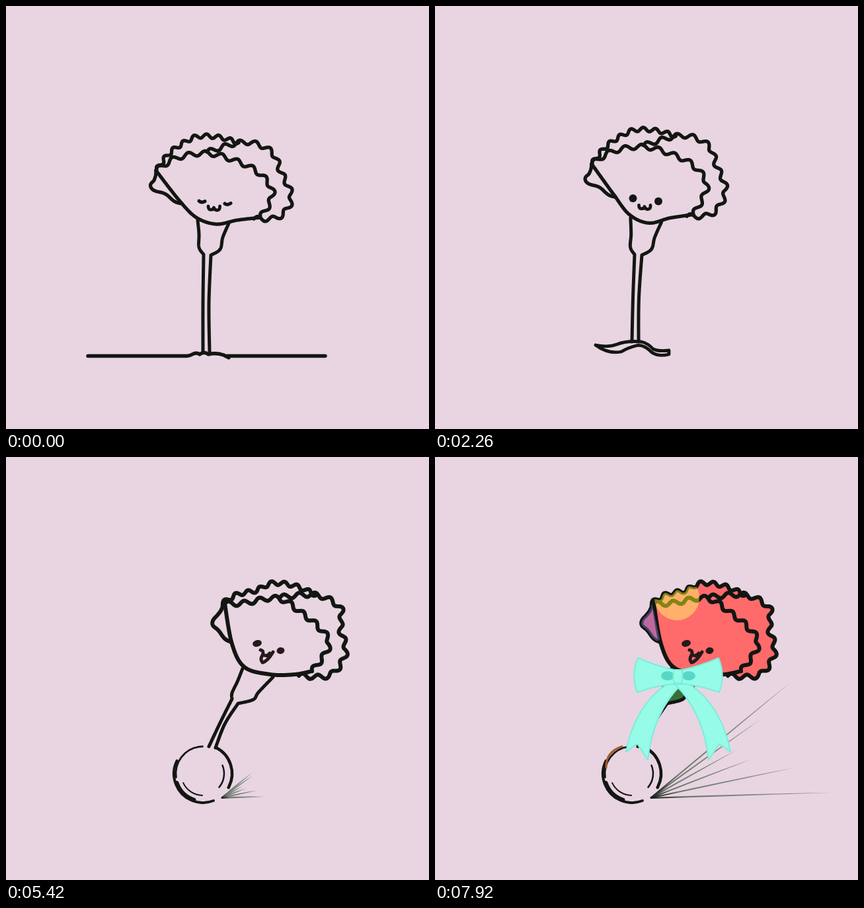
Animation of 640x640 px, one loop 8000 ms. Source, as an HTML page with a canvas:

```html
<!DOCTYPE html>
<html>
<head>
<meta charset="utf-8">
<style>
html, body { margin: 0; height: 100%; overflow: hidden; background: #e8d5e1; }
canvas { display: block; width: 100vw; height: 100vh; }
</style>
</head>
<body>
<canvas id="stage" width="640" height="640"></canvas>
<script>
const c = document.getElementById('stage').getContext('2d');
const INK = '#131612', BG = '#e8d5e1', RED = '#ff6a6b', GREEN = '#386e37';
const clamp = (v) => Math.max(0, Math.min(1, v));
const mix = (a, b, k) => a + (b - a) * k;
const ease = (v) => v * v * (3 - 2 * v);
const step = (t, start, size = 100) => Math.floor((t - start) / size);
const noise = (i) => { const v = Math.sin(i * 12.9898) * 43758.5453; return v - Math.floor(v); };
const points = (s) => s.split(' ').map(p => p.split(',').map(Number));

// Key points of an edge, upright and running, with the number of frills on it
const edge = (up, run, frills = 0, depth = 3.6) => ({ up: points(up), run: points(run), frills, depth });
const back = edge('228,248 247,223 272,205 293,197 325,199 352,207',
  '328,221 350,208 378,202 403,191 437,195 470,209', 8, 3);
const side = edge('304,221 361,206 401,220 416,251 432,290 413,319 375,322',
  '415,212 470,209 506,229 506,260 514,296 490,330 443,331', 11);
const front = edge('227,249 258,230 305,223 352,236 382,252 402,276 400,296 385,320',
  '331,222 360,221 412,214 450,238 474,258 489,279 482,299 463,324', 10);
const chin = edge('385,320 350,324 318,330 288,320 262,294 227,249',
  '463,324 437,329 400,329 361,318 342,283 331,222');
const fold = edge('227,249 223,262 223,276 266,299', '328,221 320,240 314,257 341,280', 2, 2);
const cupL = edge('290,324 292,345 292,365 299,376', '358,320 350,340 342,357 342,366');
const cupR = edge('337,329 328,350 324,368 310,377', '404,333 382,356 374,367 351,373');
const stemL = edge('299,376 298,450 298,524', '342,366 325,400 307,438');
const stemR = edge('310,377 307,450 308,524', '351,373 331,404 317,440');

function stroke(path, width, color = INK) {
  c.lineWidth = width;
  c.strokeStyle = color;
  c.stroke(typeof path == 'string' ? new Path2D(path) : path);
}
function fill(path, color) {
  c.fillStyle = color;
  c.fill(typeof path == 'string' ? new Path2D(path) : path);
}
function dot(x, y, rx, ry = rx, color = INK, turn = 0) {
  c.fillStyle = color;
  c.beginPath();
  c.ellipse(x, y, rx, ry, turn, 0, 7);
  c.fill();
}

// Upright key points bent by the pose, then blended into the running ones
function place(e, s) {
  return e.up.map(([x, y], i) => {
    const high = clamp((524 - y) / 148), tip = clamp((336 - y) / 36);
    const px = x + high * (s.dx + 3 * s.bend) + s.bend * 0.055 * Math.max(0, 376 - y);
    const py = y + high * s.dy - 10 * s.bend * tip + (s.foot - 524) * (1 - high);
    return [mix(px, e.run[i][0], s.run), mix(py, e.run[i][1], s.run)];
  });
}

// Smooth curve through the key points, with frills across it
function curve(e, s) {
  const keys = place(e, s), last = keys.length - 1, at = (i) => keys[Math.max(0, Math.min(last, i))];
  const line = [], far = [0], N = 24;
  for (let i = 0; i <= last * N; i++) {
    const k = Math.min(last - 1, Math.floor(i / N)), u = i / N - k;
    line.push([0, 1].map(d => {
      const [a, b, e, f] = [-1, 0, 1, 2].map(o => at(k + o)[d]);
      return b + u * (e - a + u * (2 * a - 5 * b + 4 * e - f + u * (3 * (b - e) + f - a))) / 2;
    }));
    if (i) far.push(far[i - 1] + Math.hypot(line[i][0] - line[i - 1][0], line[i][1] - line[i - 1][1]));
  }
  if (!e.frills) return line;
  return line.map(([x, y], i) => {
    const p = line[Math.max(0, i - 1)], q = line[Math.min(line.length - 1, i + 1)];
    const dx = q[0] - p[0], dy = q[1] - p[1], len = Math.hypot(dx, dy) || 1;
    const w = e.depth * Math.sin(2 * Math.PI * e.frills * far[i] / far[far.length - 1]);
    return [x + dy / len * w, y - dx / len * w];
  });
}
function trace(line) {
  const path = new Path2D();
  line.forEach(p => path.lineTo(...p));
  return path;
}

function pose(t) {
  const s = { run: 0, bend: 0, dx: 0, dy: 0, foot: 524, eyes: 'shut', fx: 0, fy: 0, my: 0, ground: 0, feet: false, tilt: 0 };
  if (t >= 500) s.eyes = 'open';
  if (t >= 700) s.dx = 1;
  if (t >= 1200) Object.assign(s, { eyes: 'strain', dx: -4, dy: 8, fx: -4, fy: 8 });
  if (t >= 1500) {
    const u = clamp(step(t, 1500, 58.4) / 13);
    const leap = -30 * Math.sin(Math.PI * clamp((u - 0.3) / 0.7));
    const off = 1 - ease(clamp((u - 0.2) / 0.4));
    s.bend = ease(clamp((u - 0.35) / 0.5));
    s.dx = -4 * off + (u < 0.45 ? 4 * Math.sin(u * 40) : 0);
    s.dy = 8 * off + leap;
    s.feet = u > 0.38;
    s.foot = s.feet ? 508 + leap : 524;
    s.fx = s.dx + 2.5 * s.bend;
    s.fy = s.dy - 4.5 * s.bend;
    s.my = 3 * s.bend;
    s.ground = u > 0.78 ? null : 70 * clamp((u - 0.38) / 0.4) ** 2;
    if (u > 0.6) s.eyes = 'open';
  }
  if (t >= 2660) s.eyes = 'shut';
  if (t >= 2810) Object.assign(s, { eyes: 'open', fx: 2, fy: -7.5, my: 0.5 });
  let rise = 0;
  if (t >= 3160 && t < 3520) rise = -36 * Math.sin(Math.PI * (step(t, 3160, 120) + 1) / 4);
  if (t >= 4020 && t < 4920) {
    const n = step(t, 4020);
    rise = -12 * Math.sin(n * Math.PI / 4) ** 2;
    s.tilt = 0.07 * Math.sin(n * Math.PI / 2);
  }
  s.dy += rise;
  s.fy += rise;
  if (t >= 4920) s.run = ease(clamp(step(t, 4920) / 4));
  return s;
}

function ground(y) {
  c.save();
  c.translate(0, y);
  stroke('M124 529.5H274Q279 529 284 526Q289 524 293 527Q300 522 306 527Q317 524 329 528L337 532M334 529.5H483', 5.5);
  c.restore();
}

function feet(s) {
  c.save();
  c.translate(304, s.foot);
  c.rotate(s.tilt);
  c.translate(-304, -508);
  stroke('M243 513Q262 517 275 512Q290 506 312 508Q322 510 330 519Q338 523 354 521V527Q338 531 328 524Q315 511 304 514Q292 517 282 523Q262 527 243 513', 4.8);
  c.restore();
}

function face(s) {
  if (s.run > 0.9) {
    dot(380, 282, 7, 5, '#241a1a', -0.25);
    dot(415.5, 293, 6, 5, '#241a1a', -0.2);
    stroke('M385 292Q391 293 388 300Q384 306 388 311Q396 309 404 295M389 299Q395 303 399 297', 5, '#241a1a');
    return;
  }
  c.save();
  c.translate(s.fx + 75 * s.run, s.fy - 5 * s.run);
  if (s.eyes == 'open') {
    dot(297, 295.5, 6);
    dot(335.5, 300, 6);
  } else if (s.eyes == 'shut') {
    stroke('M292 295Q296 298.5 301 295.5M331 299Q335 302 340 298.5', 5);
  } else {
    stroke('M294 291L299 296L291 296M338 296L331 300L338 303', 4.5);
  }
  c.translate(0, s.my);
  stroke('M306 303Q306 309 311 308Q314 308 314.5 305Q316 309 319 309Q324 309 323.5 303', 4.8);
  c.restore();
}

function wheel(size, turn) {
  const arc = (r, from, to, width) => {
    c.lineWidth = width;
    c.beginPath();
    c.arc(0, 0, r, from, to);
    c.stroke();
  };
  c.save();
  c.translate(298, 521);
  c.scale(size, size);
  c.translate(0, -42);
  c.rotate(turn);
  c.strokeStyle = INK;
  arc(42, 1.9, 2.8, 6);
  arc(44, 1.2, 3.6, 4);
  arc(41, 3, 4.7, 2.8);
  arc(44, -1.1, 0.5, 4.5);
  arc(33, 1.6, 2.7, 2);
  arc(32, -0.4, 0.7, 2.5);
  if (turn) arc(34, 3.8, 5.8, 2);
  c.restore();
}

// Fan of streaks behind the wheel
function dust(n) {
  const scale = n < 4 ? 0.25 + n * 0.15 : 1;
  for (let i = 0; i < 6; i++) {
    const turn = -0.66 * (1 - (i / 5) ** 1.4) - 0.03;
    const len = scale * (145 + 110 * Math.cos(Math.PI * i / 5) ** 2) * (0.95 + 0.15 * noise(n * 6 + i));
    c.save();
    c.translate(326, 516);
    c.rotate(turn);
    const g = c.createLinearGradient(0, 0, len, 0);
    g.addColorStop(0, INK);
    g.addColorStop(0.2, '#70786f');
    g.addColorStop(1, '#8e978d');
    c.fillStyle = g;
    c.beginPath();
    c.moveTo(0, -1);
    c.quadraticCurveTo(len * 0.6, -2, len, 0);
    c.quadraticCurveTo(len * 0.6, 0.5, 0, 1);
    c.fill();
    c.restore();
  }
}

// Paint flies in, hits at the fourth step and drips away
function splash(n, color, shade, ox, oy) {
  const after = Math.max(0, n - 3), size = 1 - after * 0.13;
  c.save();
  c.translate(350 + ox + (n < 3 ? (n - 3) * 165 : after * 62), 390 + oy + after * 8);
  c.scale(size, size);
  c.translate(-350, -390);
  fill('M362 328Q400 330 428 340L424 370L411 378Q413 395 440 420L392 443L380 466L328 415Q335 390 346 373Q350 346 362 328Z', color);
  stroke('M410 341L448 349', 14, color);
  stroke('M395 362H418', 20, color);
  stroke('M370 410L402 471', 24, color);
  stroke('M385 400L459 449', 28, color);
  stroke('M373 372Q382 352 402 350', 20, shade);
  stroke('M350 407Q358 388 364 388M352 405L382 398', 18, shade);
  dot(426, 420, 2.5, 2.5, BG);
  dot(436, 431, 3.5, 3.5, BG);
  if (n >= 3) for (let i = 0; i < 9; i++) {
    dot(430 + 180 * noise(i + 1) + after * 14, 342 + i * 21, 3 + 4 * noise(i + 40), undefined, color);
  }
  c.restore();
}

function bow(y) {
  const light = '#96fce7', rim = '#7beddb', dark = '#57d8c6';
  const part = (d) => { fill(d, light); stroke(d, 2, rim); };
  c.save();
  c.translate(368, y);
  for (const flip of [1, -1]) {
    c.save();
    c.scale(flip, 1);
    part('M-18 344Q-66 378 -79 446L-62 434L-46 458Q-38 386 5 344Z');
    part('M-61 304Q-34 316 -6 322V343Q-34 346 -62 356Q-72 330 -61 304Z');
    dot(-16, 331, 10, 7, dark);
    c.restore();
  }
  part('M-6 322H5Q8 332 5 342H-6Q-9 332 -6 322Z');
  c.restore();
}

// Coloured light on the petals
function glow(head, leaf) {
  c.save();
  c.clip(head);
  c.globalCompositeOperation = 'screen';
  dot(366, 213, 34, 34, '#7a7800');
  c.restore();
  c.save();
  c.clip(leaf);
  c.globalAlpha = 0.5;
  dot(322, 250, 32, 32, '#7a6ac8');
  c.restore();
  stroke('M259 470Q258 446 283 438', 3, '#a35a30');
}

function draw(t) {
  const s = pose(t), n = step(t, 5420);
  const shape = (e) => curve(e, s);
  c.fillStyle = BG;
  c.fillRect(0, 0, 640, 640);
  c.lineCap = c.lineJoin = 'round';

  if (s.ground !== null) ground(s.ground);
  if (s.feet && s.run < 0.1) feet(s);
  if (n >= 0) dust(n);
  if (s.run > 0.1) wheel(s.run, n > 0 && n % 2 == 0 ? 0.18 : 0);

  const left = [cupL, stemL].flatMap(shape), right = [cupR, stemR].flatMap(shape);
  if (t >= 7020) fill(trace([...left, ...[...right].reverse()]), GREEN);
  stroke(trace(left), 5);
  stroke(trace(right), 5);

  const head = trace([back, side, chin].flatMap(shape)), leaf = trace(shape(fold));
  if (t >= 6120) {
    fill(head, RED);
    fill(trace([front, chin].flatMap(shape)), RED);
    fill(leaf, RED);
  }
  for (const e of [back, side, front, chin, fold]) stroke(trace(shape(e)), mix(5.3, 6, s.run));
  face(s);

  if (t >= 5820 && t < 6720) splash(step(t, 5820), RED, '#ee5358', 25, -115);
  if (t >= 6720 && t < 7620) splash(step(t, 6720), GREEN, '#214c22', 0, 0);
  if (t >= 7820) glow(head, leaf);
  if (t >= 7620) bow(-300 * (1 - clamp(step(t, 7620) / 3)));
}

function frame() {
  draw(performance.now() % 8000);
  requestAnimationFrame(frame);
}
frame();
</script>
</body>
</html>
```
